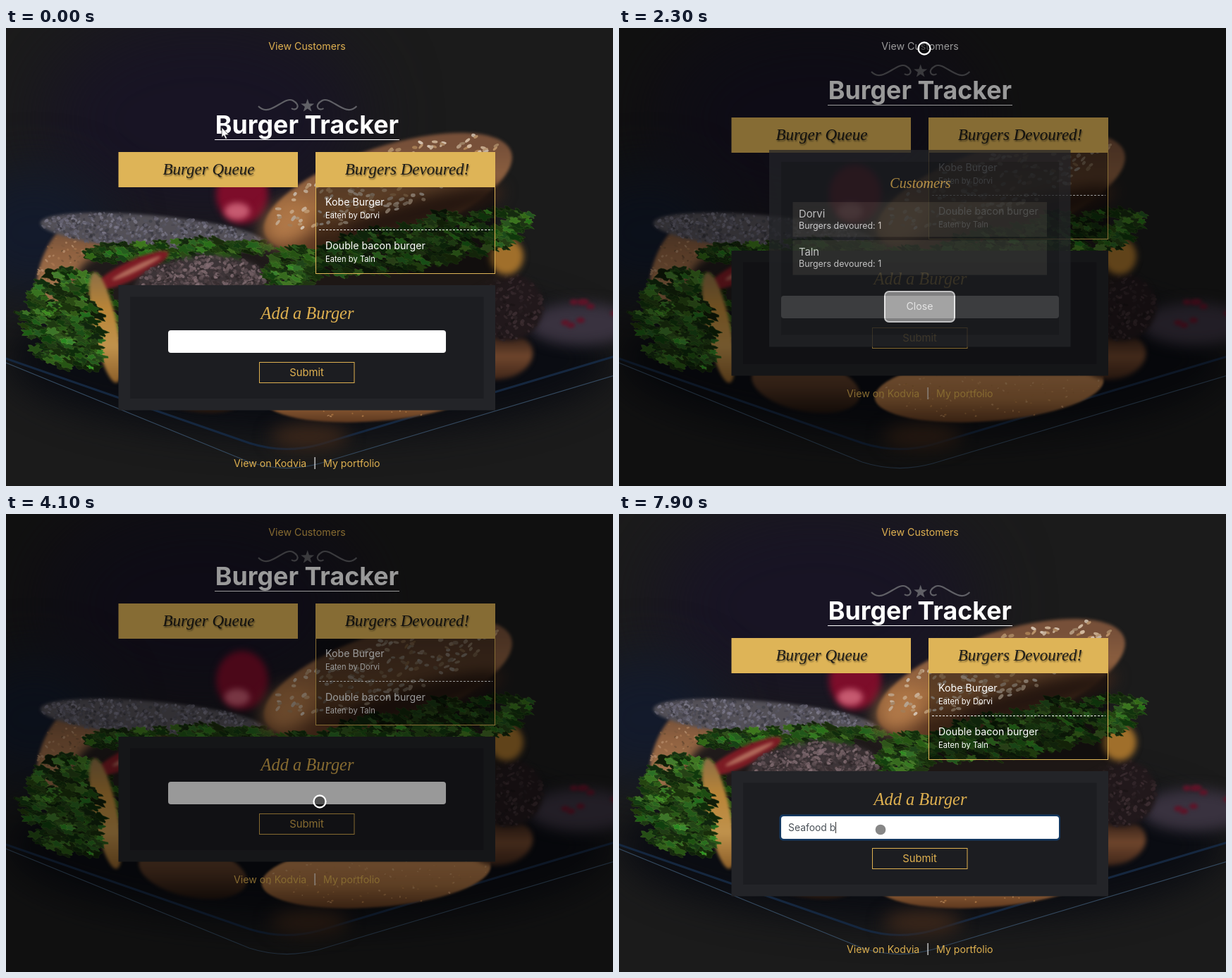
Recreate the animation shown at these times as an HTML page with a canvas. Size 861x650 px, loop 8 s.

```html
<!DOCTYPE html>
<html lang="en">
<head>
<meta charset="utf-8">
<title>Burger Tracker</title>
<style>
  html, body { margin: 0; width: 100%; height: 100%; overflow: hidden; background: #1b1b1b; }
  canvas, svg { position: absolute; left: 0; top: 0; width: 861px; height: 650px; }
  text { font: 14.2px Inter, sans-serif; fill: #fff; white-space: pre; }
  .mid { text-anchor: middle; }
  .gold { fill: #deb050; }
  .script { font: italic 23px "Liberation Serif", serif; text-anchor: middle; }
  .head { fill: #1c1b18; text-shadow: 1px 2px 2px #0007; }
  .title { font-size: 35.8px; font-weight: 700; }
  .small { font-size: 11.2px; }
  .name { font-size: 14.8px; }
  .tally { font-size: 12.45px; }
</style>
</head>
<body>
<canvas id="photo" width="861" height="650"></canvas>
<svg viewBox="0 0 861 650">
  <defs>
    <path id="swirl" d="M358 111C374 128 394 96 407 103S411 119 405 114" fill="none" stroke="#606066" stroke-width="2.2"/>
  </defs>
  <text id="link" class="mid gold" x="427" y="31">View Customers</text>
  <g id="page">
    <use href="#swirl"/>
    <use href="#swirl" transform="translate(855.4) scale(-1 1)"/>
    <path id="star" fill="#606066"/>
    <text class="mid title" x="427" y="150">Burger Tracker</text>
    <path d="M296 158.5H558" stroke="#fff"/>
    <path d="M159.500 176H414V226H159.500ZM439 176H694V226H439Z" fill="#deb457"/>
    <text class="script head" x="287.500" y="208">Burger Queue</text>
    <text class="script head" x="569" y="208">Burgers Devoured!</text>
    <rect x="439.500" y="225.500" width="254" height="123" fill="#0006" stroke="#deb457"/>
    <path d="M444 286.500H690" stroke="#fff" stroke-dasharray="3 2"/>
    <g id="eaten"></g>
    <rect x="159.500" y="365" width="534.500" height="177.500" fill="#232428"/>
    <rect x="176" y="381.500" width="501.500" height="144.500" fill="#1c1d21"/>
    <text class="script gold" x="427.500" y="413" style="font-size:24.4px">Add a Burger</text>
    <rect id="ring" x="227.500" y="426.500" width="398.500" height="37" rx="5" fill="#133861"/>
    <rect x="230" y="429" width="394" height="32" rx="4" fill="#fff"/>
    <text id="typed" x="240" y="450" style="font-size:13.9px;fill:#495057"></text>
    <path id="caret" d="M.5 437V453" stroke="#333"/>
    <rect x="359.500" y="474.500" width="134.500" height="29" fill="none" stroke="#deb050"/>
    <text class="mid gold name" x="426.500" y="494">Submit</text>
  </g>
  <g id="footer">
    <text class="gold" x="323" y="623">View on Kodvia</text>
    <text class="mid" x="438" y="623">|</text>
    <text class="gold" x="450" y="623">My portfolio</text>
  </g>
  <rect id="backdrop" width="861" height="650"/>
  <g id="modal">
    <rect x="213" y="186" width="427.500" height="279.500" fill="#232428"/>
    <rect x="230" y="203" width="394" height="245.500" fill="#1c1e21"/>
    <text class="script gold" x="427.500" y="240" style="font-size:20.2px">Customers</text>
    <g id="customers"></g>
    <rect x="377" y="387" width="99" height="43" rx="6" fill="#a7a7a7" stroke="#fff" stroke-width="2"/>
    <text class="mid" x="426.500" y="413">Close</text>
  </g>
  <path id="arrow" d="M306 141V155L309 152.500L311.500 157.500L313.500 156.500L311.200 151.700H316Z" fill="#fff" stroke="#222" stroke-width=".7"/>
  <circle id="dot" r="8.500" fill="#00000078" stroke="#fff" stroke-width="2.300"/>
</svg>
<script>
const $ = id => document.getElementById(id);
const ctx = $('photo').getContext('2d');
let seed = 7;
const rnd = (a = 0, b = 1) => {
  seed = (seed * 16807) % 2147483647;
  return a + (b - a) * seed / 2147483647;
};

// A shape is an ellipse: [x, y, rx, ry, turn].
function fill([x, y, rx, ry, turn = 0], color, blur = 0) {
  ctx.filter = blur ? `blur(${blur}px)` : 'none';
  ctx.fillStyle = color;
  ctx.beginPath();
  ctx.ellipse(x, y, rx, ry, turn, 0, 2 * Math.PI);
  ctx.fill();
  ctx.filter = 'none';
}
function scatter([x, y, rx, ry, turn = 0], count, draw) {
  const c = Math.cos(turn), s = Math.sin(turn);
  for (let i = 0; i < count; i++) {
    const a = rnd(0, 2 * Math.PI), d = Math.sqrt(rnd());
    const u = d * rx * Math.cos(a), v = d * ry * Math.sin(a);
    draw(x + u * c - v * s, y + u * s + v * c, i / count);
  }
}
function shade([x, y, , ry], ...colors) {
  const g = ctx.createLinearGradient(x, y - ry, x, y + ry);
  colors.forEach((c, i) => g.addColorStop(i / (colors.length - 1), c));
  return g;
}
function crumbs(shape, count, size, hue, sat, dark, light) {
  scatter(shape, count, (x, y) =>
    fill([x, y, rnd(.4, 1) * size, rnd(.3, .7) * size, rnd(-1, 1)], `hsl(${hue} ${sat}% ${rnd(dark, light)}% / .7)`));
}
// Ruffled leaves, the later ones brighter and smaller.
function lettuce(shape, count) {
  scatter(shape, count, (x, y, p) => {
    const size = rnd(14, 20) - 9 * p, start = rnd(0, 6), light = 7 + p * rnd(4, 32);
    ctx.fillStyle = `hsl(${rnd(95, 118)} ${rnd(45, 65)}% ${light}%)`;
    ctx.strokeStyle = `hsl(95 50% ${light + 9}% / .5)`;
    ctx.beginPath();
    for (let a = 0; a < 6.2; a += .3) {
      const r = size * (.75 + .22 * Math.sin(a * 5 + start) + rnd(-.12, .12));
      ctx.lineTo(x + r * Math.cos(a), y + r * .6 * Math.sin(a + start * .15));
    }
    ctx.closePath();
    ctx.fill();
    ctx.stroke();
  });
}
function edge(drop, color, width) {
  ctx.strokeStyle = color;
  ctx.lineWidth = width;
  ctx.beginPath();
  ctx.moveTo(-9, 466 + drop * .2);
  ctx.lineTo(345, 589 + drop);
  ctx.quadraticCurveTo(395, 605 + drop, 445, 591 + drop);
  ctx.lineTo(870, 464 + drop);
  ctx.stroke();
  ctx.lineWidth = 1;
}

function paintPhoto() {
  ctx.fillStyle = '#1b1b1b';
  ctx.fillRect(0, 0, 861, 650);
  fill([280, 130, 230, 150], '#181424', 50);
  fill([40, 290, 110, 90], '#131a2b', 35);
  fill([430, 470, 430, 110], '#0a0c12', 25);
  edge(0, '#15273f', 3);
  edge(27, '#34495f', 1.2);
  fill([430, 580, 55, 18], '#3a261a', 12);
  fill([815, 420, 75, 30], '#39323f', 9);
  scatter([820, 405, 45, 22], 8, (x, y) => fill([x, y, 6, 4], '#5e1428', 2));
  fill([335, 236, 37, 42], '#7d0d2a', 5);
  fill([328, 260, 18, 12], '#c65a70', 4);

  const base = [525, 512, 163, 46, -.08];
  fill(base, shade(base, '#5b3822', '#ad7748', '#9a673b', '#603a20'), 1.5);
  crumbs(base, 150, 2, 30, 45, 40, 62);
  const heel = [265, 508, 78, 36, .2];
  fill(heel, shade(heel, '#66452f', '#4f3322', '#23160f'), 2);
  const corner = [702, 466, 46, 32, -.2];
  fill(corner, shade(corner, '#2c1c16', '#6e452c', '#41271a'), 3);
  const patty = [712, 396, 50, 48];
  fill(patty, '#21181b', 3);
  crumbs(patty, 180, 4, 345, 14, 8, 24);

  const crust = [98, 345, 50, 82, .35];
  fill(crust, shade(crust, '#5c4436', '#8f6140', '#a5754e', '#5b3a24'), 2);
  crumbs(crust, 180, 3, 27, 35, 25, 60);
  fill([250, 355, 150, 55], '#1f1a1a', 6);
  const bread = [208, 291, 160, 25, .09];
  fill(bread, '#535057', 2);
  crumbs(bread, 700, 3.5, 250, 7, 20, 55);
  lettuce([245, 317, 130, 14, -.04], 130);
  lettuce([92, 412, 66, 70, .5], 260);
  fill([178, 344, 58, 13, -.45], '#7c1c24', 2);
  fill([185, 341, 38, 4, -.45], '#b0695a', 2);
  const cheese = [141, 425, 17, 80, -.2];
  fill(cheese, shade(cheese, '#8a6d45', '#b98538', '#c0924c', '#8a5d28'), 2);
  lettuce([110, 425, 22, 65, -.2], 60);
  const meat = [275, 362, 92, 38, -.08];
  fill(meat, '#3c3437', 3);
  crumbs(meat, 700, 4, 345, 9, 14, 52);

  fill([560, 350, 170, 60, -.2], '#1d1715', 8);
  const bun = [542, 234, 184, 66, -.32];
  fill(bun, shade(bun, '#775039', '#8d6040', '#9c683d', '#5d3822'), 2);
  fill([400, 278, 38, 28, -.6], '#b07848', 12);
  fill([590, 262, 120, 22, -.27], '#3d251a', 10);
  scatter([540, 218, 168, 42, -.32], 190, (x, y) =>
    fill([x, y, rnd(3, 4.6), rnd(1.6, 2.6), rnd(-1, .5)], `hsl(30 ${rnd(20, 38)}% ${rnd(48, 76)}%)`));
  fill([710, 324, 24, 26], '#a06f2b', 4);
  lettuce([590, 305, 165, 34, -.2], 330);
  lettuce([405, 343, 42, 30, -.4], 90);
}

const star = Array.from({ length: 10 }, (_, i) => {
  const r = i % 2 ? 4 : 10, a = i * Math.PI / 5;
  return `${427.7 + r * Math.sin(a)} ${110.5 - r * Math.cos(a)}`;
});
$('star').setAttribute('d', `M${star.join('L')}Z`);

const meals = [['Kobe Burger', 'Dorvi'], ['Double bacon burger', 'Taln']];
$('eaten').innerHTML = meals.map(([burger, name], i) => `
  <g transform="translate(453 ${252 + 62 * i})">
    <text>${burger}</text><text class="small" y="18">Eaten by ${name}</text>
  </g>`).join('');
$('customers').innerHTML = meals.map(([, name], i) => `
  <g transform="translate(246.5 ${260 + 54 * i})">
    <rect width="360.500" height="49.500" fill="#353533"/>
    <text class="name" x="8.500" y="22">${name}</text>
    <text class="tally" x="8.500" y="38">Burgers devoured: 1</text>
  </g>`).join('');

// Progress from 0 to 1 between two times.
const ramp = (t, from, to) => Math.min(1, Math.max(0, (t - from) / (to - from)));
const ease = p => p * p * (3 - 2 * p);

// Pointer glides: from, to, x, y.
const glides = [
  [0, 500, 248, 137], [600, 900, 614, 450], [1100, 1400, 248, 440], [1400, 1800, 433, 29],
  [2600, 3100, 298, 341], [3100, 3400, 357, 386], [3500, 3800, 445, 408],
  [4200, 4300, 377, 406], [4300, 4900, 371, 448]
];
function pointer(t) {
  let x = 306, y = 147;
  for (const [from, to, nextX, nextY] of glides) {
    const p = ease(ramp(t, from, to));
    x += (nextX - x) * p;
    y += (nextY - y) * p;
  }
  return `translate(${x} ${y})`;
}

const focusTime = 5100;
const keyTimes = [6000, 6200, 6500, 6800, 6900, 7000, 7200, 7800, 7900];
const shift = (id, y) => $(id).setAttribute('transform', `translate(0 ${y})`);

function draw(t) {
  const open = t >= 2200 && t < 4300;
  shift('page', open ? -49 : 0);
  shift('footer', open ? -99 : 0);
  $('link').style.fill = t >= 1800 && t < 4000 ? '#fff' : '';
  $('backdrop').style.opacity = open ? .4 * ramp(t, 2100, 2300) : 0;
  const shown = ease(ramp(t, 2100, 2400)) * (1 - ramp(t, 3900, 4100));
  $('modal').style.opacity = shown;
  shift('modal', -50 * (1 - shown));

  $('ring').style.opacity = ramp(t, 5000, 5300);
  const pressed = keyTimes.filter(at => at <= t);
  $('typed').textContent = 'Seafood b'.slice(0, pressed.length);
  const width = pressed.length ? $('typed').getComputedTextLength() : 0;
  $('caret').setAttribute('transform', `translate(${Math.round(240 + width)} 0)`);
  const idle = t - (pressed.at(-1) ?? focusTime);
  $('caret').style.opacity = idle >= 0 && idle % 1000 < 500 ? 1 : 0;

  $('arrow').style.display = t < 100 ? '' : 'none';
  $('dot').style.display = t < 100 ? 'none' : '';
  $('dot').setAttribute('transform', pointer(t));
}

paintPhoto();
const begin = performance.now();
function tick() {
  const t = (performance.now() - begin) % 8000;
  draw(Math.floor(t / 100) * 100);
  requestAnimationFrame(tick);
}
tick();
</script>
</body>
</html>
```
